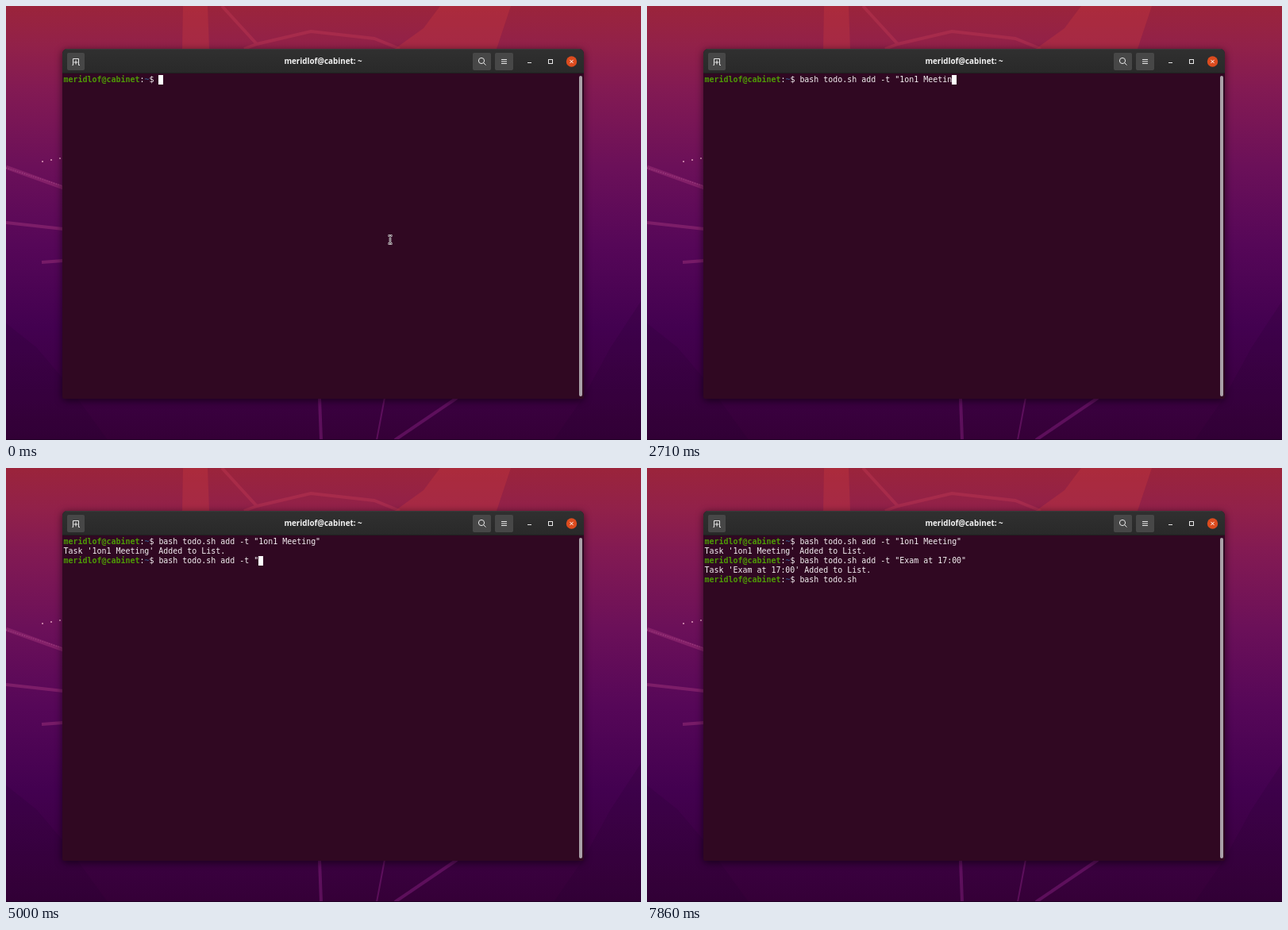
An HTML page for the animation above (8 s loop, 800x547 px).

```html
<!DOCTYPE html>
<html lang="en">
<head>
<meta charset="utf-8">
<title>Terminal</title>
<style>
  html, body { margin: 0; width: 100%; height: 100%; overflow: hidden; background: #360038; }
  svg { position: absolute; left: 0; top: 0; }
  #window {
    position: absolute; left: 71px; top: 54px; width: 657px; height: 441px;
    border-radius: 6px 6px 2px 2px; background: #300822; overflow: hidden;
  }
  #shadow {
    position: absolute; left: 71px; top: 54px; width: 657px; height: 441px;
    border-radius: 6px; box-shadow: 0 2px 9px 1px rgba(0, 0, 0, .5);
  }
  #header {
    height: 31px; background: linear-gradient(#303030, #292929);
    box-shadow: inset 0 1px #393939, inset 0 -1px #202020;
    font: bold 9.8px/31px "Open Sans", "Noto Sans", sans-serif;
    color: #f4f4f4; text-align: center;
  }
  #screen {
    position: absolute; left: 72.5px; top: 87px; margin: 0;
    font: 9.967px/12px "DejaVu Sans Mono", monospace; color: #f5f0f3;
  }
  .user { color: #4e9a06; font-weight: bold; }
  .path { color: #35507f; font-weight: bold; }
  .cursor { display: inline-block; width: 6px; height: 12px; background: #fff; vertical-align: top; }
</style>
</head>
<body>
<svg width="800" height="547" viewBox="0 0 800 547">
  <defs>
    <linearGradient id="sky" x2="0" y2="1">
      <stop offset="0" stop-color="#9b243b"/>
      <stop offset=".09" stop-color="#922149"/>
      <stop offset=".19" stop-color="#831a53"/>
      <stop offset=".37" stop-color="#6b1059"/>
      <stop offset=".55" stop-color="#560758"/>
      <stop offset=".74" stop-color="#430150"/>
      <stop offset="1" stop-color="#350037"/>
    </linearGradient>
  </defs>
  <rect width="800" height="547" fill="url(#sky)"/>
  <g fill="#c8383f" opacity=".36">
    <path d="M223 0H254L256 54H222Z"/>
    <path d="M547 0H636L618 54H490L526 28Z"/>
  </g>
  <g fill="none" stroke="#c23a55" stroke-opacity=".38" stroke-width="4">
    <path d="M272 0L316 48L384 32L464 41L496 54M316 48L300 54"/>
  </g>
  <g fill="none" stroke="#a5357c" stroke-opacity=".45" stroke-width="4">
    <path d="M0 273L72 281M45 323L72 321"/>
    <path d="M0 203L72 229" stroke-width="5"/>
    <path d="M0 204L72 227" stroke="#d184ae" stroke-width="1" stroke-dasharray="1 2"/>
  </g>
  <g fill="#d795b4">
    <circle cx="46" cy="196" r="1.1"/><circle cx="57" cy="194" r="1.1"/><circle cx="68" cy="192" r="1.1"/>
  </g>
  <g fill="none" stroke="#7c1c77" stroke-opacity=".55">
    <path d="M395 494L397 547" stroke-width="4"/>
    <path d="M477 494L467 547" stroke-width="2"/>
    <path d="M568 494L490 547" stroke-width="4"/>
  </g>
  <g fill="#250030" opacity=".18">
    <path d="M0 400L38 430L72 470L128 547H0Z"/>
    <path d="M800 372L762 430L728 492L690 547H800Z"/>
  </g>
  <rect y="546" width="800" height="1" fill="#210026"/>
</svg>

<div id="shadow"></div>
<div id="window"><div id="header"></div></div>

<svg width="800" height="547" viewBox="0 0 800 547">
  <g fill="#474747">
    <rect x="77" y="59" width="22" height="22" rx="2"/>
    <rect x="588" y="59" width="23" height="22" rx="2"/>
    <rect x="616" y="59" width="23" height="22" rx="2"/>
  </g>
  <g fill="none" stroke="#e8e8e8">
    <path d="M83.5 74.5H84.5V66.5H91.5V74.5H93M88 68.5V73.5M85.5 71H90.5"/>
    <circle cx="599" cy="69" r="3.6"/>
    <path d="M601.7 71.7L604.5 74.5"/>
    <path d="M624 67.5H631M624 70H631M624 72.5H631"/>
    <path d="M657 71.5H662"/>
    <rect x="683.5" y="67.5" width="5" height="5"/>
  </g>
  <circle cx="712.5" cy="70" r="6.7" fill="#dc4b1e"/>
  <path d="M710.4 67.9L714.6 72.1M714.6 67.9L710.4 72.1" stroke="#fff"/>
  <rect x="722" y="88" width="4" height="404" rx="2" fill="#aaa1a8"/>
  <g id="pointer" fill="none">
    <path d="M481.5 289.5H483L484 290.5L485 289.5H486.5M484 290V299M481.5 299.5H483L484 298.5L485 299.5H486.5" stroke="#ddd" stroke-width="2.6"/>
    <path d="M482 289.5H483L484 290.5L485 289.5H486M484 290V299M482 299.5H483L484 298.5L485 299.5H486" stroke="#271020" stroke-width=".8"/>
  </g>
</svg>
<pre id="screen"></pre>

<script>
const LOOP = 8000, TICK = 1000 / 7;
const USER = 'meridlof@cabinet';
const PROMPT = `<span class="user">${USER}</span>:<span class="path">~</span>$ `;
const CURSOR = '<span class="cursor"></span>';

// keys: [tick, characters typed]; enter: tick at which the reply appears
const commands = [
  { text: 'bash todo.sh add -t "1on1 Meeting"', reply: "Task '1on1 Meeting' Added to List.",
    keys: [[0, 0], [5, 9], [13, 21], [16, 26], [20, 34]], enter: 21 },
  { text: 'bash todo.sh add -t "Exam at 17:00"', reply: "Task 'Exam at 17:00' Added to List.",
    keys: [[25, 0], [32, 18], [35, 21], [36, 21], [40, 25], [43, 31], [48, 35]], enter: 49 },
  { text: 'bash todo.sh ', keys: [[49, 0], [51, 13]], enter: Infinity }
];
const cursorOff = new Set([25, 55]);

const screen = document.getElementById('screen');
const pointer = document.getElementById('pointer');
document.getElementById('header').textContent = USER + ': ~';

function typedCount(keys, tick) {
  let [fromTick, fromCount] = keys[0];
  if (tick <= fromTick) return fromCount;
  for (const [toTick, toCount] of keys) {
    if (tick <= toTick) {
      return Math.round(fromCount + (toCount - fromCount) * (tick - fromTick) / (toTick - fromTick));
    }
    [fromTick, fromCount] = [toTick, toCount];
  }
  return fromCount;
}

function render(tick) {
  let html = '';
  for (const { text, reply, keys, enter } of commands) {
    if (tick < enter) {
      html += PROMPT + text.slice(0, typedCount(keys, tick));
      break;
    }
    html += `${PROMPT}${text}\n${reply}\n`;
  }
  screen.innerHTML = html + (cursorOff.has(tick) ? '' : CURSOR);
  pointer.style.display = tick ? 'none' : '';
}

const start = performance.now();
let shown = -1;
function frame() {
  const time = (performance.now() - start) % LOOP;
  const tick = Math.min(55, Math.floor((time + 4) / TICK));
  if (tick !== shown) render(shown = tick);
  requestAnimationFrame(frame);
}
frame();
</script>
</body>
</html>
```
